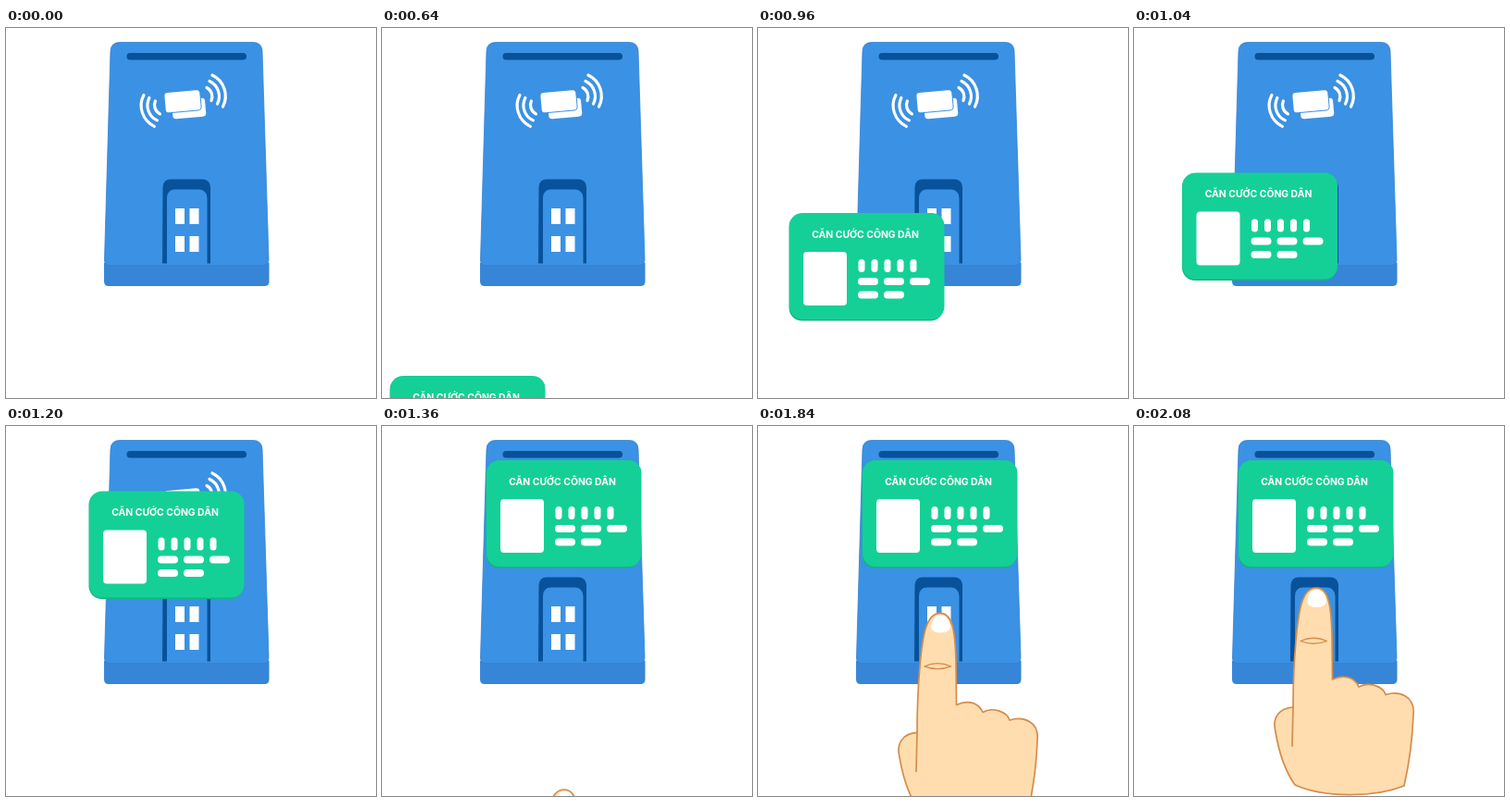
These frames come from a looping animation (400 by 400 pixels, 3920 ms). An HTML page:

```html
<!DOCTYPE html>
<html lang="vi">
<head>
<meta charset="utf-8">
<title>Card reader</title>
<style>
  html, body { margin: 0; width: 100%; height: 100%; overflow: hidden; background: #fff; }
  svg { display: block; width: 100%; height: 100%; }
  text { font: 700 10.4px Inter, "Open Sans", sans-serif; text-anchor: middle; fill: #fff; }
</style>
</head>
<body>
<svg viewBox="0 0 400 400">
  <defs>
    <g id="waves" fill="none" stroke="#fff" stroke-width="3.2" stroke-linecap="round">
      <path d="M223 51A25 25 0 0 1 234.5 85"/>
      <path d="M220 57.5A18 18 0 0 1 228.5 82"/>
      <path d="M217 64.5A11 11 0 0 1 222 78.500"/>
    </g>
    <rect id="window" width="10" height="17" fill="#fff"/>
    <rect id="dot" width="7" height="14" rx="3.5"/>
    <rect id="dash" width="22" height="8" rx="4"/>
  </defs>

  <g id="reader">
    <path fill="#3785d7" d="M106 254H284.500V274Q284.500 279 279.500 279H111Q106 279 106 274Z"/>
    <path fill="#3b91e3" stroke="#3383d5" stroke-width=".8"
      d="M113 25Q113.500 15.500 123 15.500H267Q276.500 15.500 277 25L284 250Q284 256.500 278 256.500H112Q106 256.500 106.500 250Z"/>
    <rect x="130.500" y="27" width="129.500" height="7.500" rx="3.750" fill="#07529b"/>
    <path fill="#07529b" d="M169 254.500L169.500 172Q170 163.500 178 163.500H212Q220.500 163.500 221 172V254.500Z"/>
    <path fill="#3b91e3" d="M174 255V184Q174 174.500 183 174.500H208Q217 174.500 217.500 184V255Z"/>
    <use href="#window" x="183" y="195"/>
    <use href="#window" x="198.500" y="195"/>
    <use href="#window" x="183" y="225"/>
    <use href="#window" x="198.500" y="225"/>
    <use href="#waves"/>
    <use href="#waves" transform="rotate(180 191.700 78.700)"/>
    <g fill="#fff" transform="rotate(-5 191 79)">
      <rect x="179" y="77.500" width="36" height="20" rx="3.500"/>
      <rect x="172" y="68.500" width="38" height="21.500" rx="3.500" stroke="#3b91e3" stroke-width="2" paint-order="stroke"/>
    </g>
  </g>

  <g id="card">
    <rect x="-.5" y="1" width="167" height="115.500" rx="14" fill="#10b581"/>
    <rect width="167.500" height="115" rx="14" fill="#15d096"/>
    <text x="82" y="26.500">CĂN CƯỚC CÔNG DÂN</text>
    <g fill="#fff">
      <rect x="15" y="42" width="47" height="58" rx="4"/>
      <use href="#dot" x="74.500" y="50"/>
      <use href="#dot" x="88.500" y="50"/>
      <use href="#dot" x="102.500" y="50"/>
      <use href="#dot" x="116.500" y="50"/>
      <use href="#dot" x="130.500" y="50"/>
      <use href="#dash" x="74" y="70"/>
      <use href="#dash" x="102" y="70"/>
      <use href="#dash" x="130" y="70"/>
      <use href="#dash" x="74" y="84.500"/>
      <use href="#dash" x="102" y="84.500"/>
    </g>
  </g>

  <g id="hand" fill="none" stroke="#d58c4c" stroke-width="1.700" stroke-linecap="round" stroke-linejoin="round">
    <path fill="#ffddae" d="M172 304C157 305 150 315 152.500 328C156 350 162 371 174 388
      C205 402 260 402 292 389C297 367 301 340 302 312C304 292 287 286 272 290.500
      C269 281 253 276 243 282C238 270 225 269 214.500 274L214 225
      C213 193 210 175 197 175C182 175 178 198 175 232C173 255 172 278 172 304Z"/>
    <path d="M172 303L171 346"/>
    <path d="M180 232.500Q194 226 208.500 232.500M180 232.500Q194 238 208.500 232.500" stroke-width="1.300"/>
    <path fill="#fff" stroke="none" d="M187 190C188 181 192 177 197.500 177C203 177 207 181 208 190Q207 196 197.500 196Q188 196 187 190Z"/>
  </g>
</svg>
<script>
  const LOOP = 3920, STEP = 80;
  const CARD_START = 640, HAND_START = 1360, HAND_END = 2080;
  const card = document.getElementById("card");
  const hand = document.getElementById("hand");

  // Time, x and y of the card's curved flight.
  const flight = [
    [640, 9, 376], [800, 16, 288], [960, 34, 200],
    [1120, 71, 113], [1200, 90, 70.5], [1280, 113, 37]
  ];

  function cardPosition(time) {
    const next = flight.findIndex(key => key[0] > time);
    if (next < 0) return flight.at(-1).slice(1);
    const a = flight[next - 1], b = flight[next];
    const part = (time - a[0]) / (b[0] - a[0]);
    return [1, 2].map(i => a[i] + (b[i] - a[i]) * part);
  }

  function place(element, visible, position) {
    element.style.display = visible ? "" : "none";
    if (visible) element.setAttribute("transform", `translate(${position()})`);
  }

  function draw(time) {
    const t = Math.floor(time % LOOP / STEP) * STEP;
    place(card, t >= CARD_START, () => cardPosition(t));
    place(hand, t >= HAND_START, () => {
      const left = Math.max(0, (HAND_END - t) / (HAND_END - HAND_START));
      return [0, 218 * left ** 1.886];
    });
  }

  const start = performance.now();
  function tick() {
    draw(performance.now() - start);
    requestAnimationFrame(tick);
  }
  tick();
</script>
</body>
</html>
```
